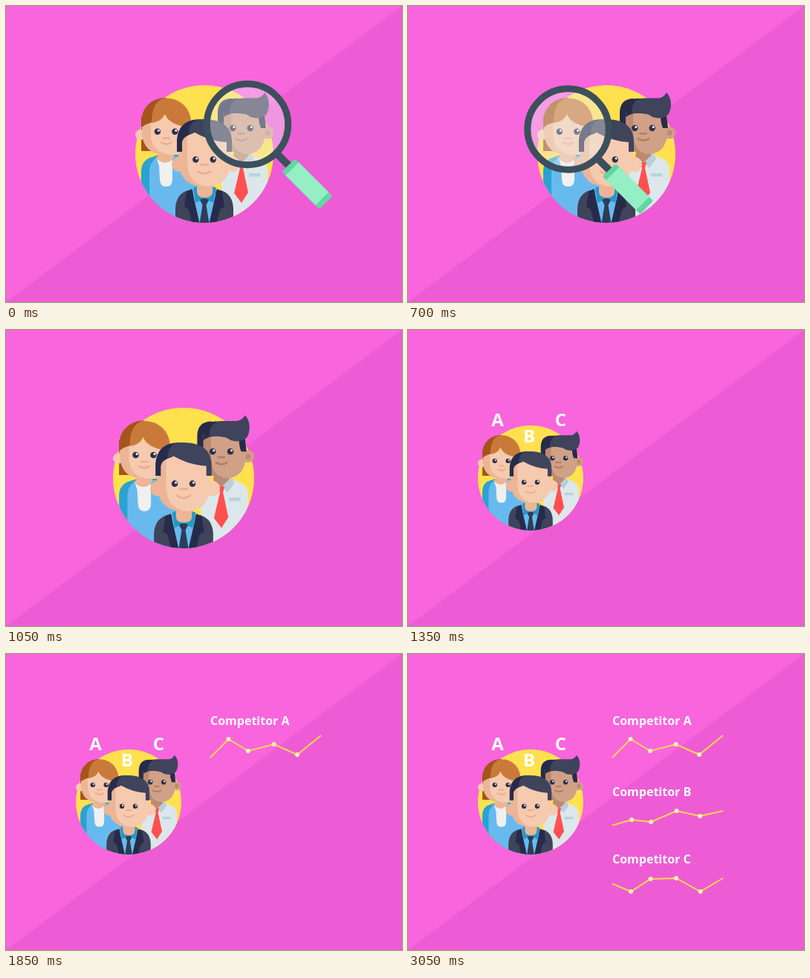
Write an HTML page that moves like this. It is 533 px wide and 400 px high and loops after 3.95 s.

```html
<!DOCTYPE html>
<html lang="en">
<head>
<meta charset="utf-8">
<title>Competitor analysis</title>
<style>
  html, body { margin: 0; width: 100%; height: 100%; overflow: hidden; }
  svg { display: block; width: 100vw; height: 100vh; }
  text { font: 700 16px "Open Sans", "Noto Sans", sans-serif; fill: #fff; }
  #labels text { font-size: 24px; text-anchor: middle; }
  .smile { fill: none; stroke-width: 2.6; stroke-linecap: round; }
</style>
</head>
<body>
<svg viewBox="0 0 533 400">
  <defs>
    <clipPath id="badge"><path d="M150 90H390V200H360A93 93 0 0 1 174 200H150Z"/></clipPath>
    <g id="eye"><circle r="4.2" fill="#2d314d"/><circle cx="1.5" cy="-1.4" r="1.5" fill="#fff"/></g>
    <g id="eyes"><use href="#eye" x="-11.7"/><use href="#eye" x="11.7"/></g>
  </defs>
  <rect width="533" height="400" fill="#f865dd"/>
  <path d="M533 0V400H0Z" fill="#ed5cd4"/>

  <g id="team">
    <circle cx="267" cy="200" r="93" fill="#ffe14f"/>
    <g clip-path="url(#badge)">
      <!-- woman -->
      <path d="M182 150H199V196H182Z" fill="#a5541a"/>
      <path d="M182 300V224Q182 208 197 204L206 201H232L262 215V300Z" fill="#2aa2d3"/>
      <path d="M193 300V224Q193 210 205 203H232L262 215V300Z" fill="#68baee"/>
      <path d="M202 204L209 209L224 207V234Q224 244 215.500 244T207 234L206 216Z" fill="#f0f0ee"/>
      <path d="M206 190H226V205Q216 218 202 206L206 200Z" fill="#ecb596"/>
      <circle cx="181" cy="174" r="7" fill="#f5caae"/>
      <path d="M183 150H249V172Q247 201 216 201T183 172Z" fill="#ecb596"/>
      <path d="M195 150H249V172Q247 201 220 201Q195 198 195 172Z" fill="#f5caae"/>
      <path d="M182 165V156C183 136 197 124 215.500 124Q205 138 197 157Q186 160 182 165Z" fill="#a5541a"/>
      <path d="M196 158C196 138 203 125 215.500 124.500C235 124.500 249 139 249 157V164C231 163 217 156 214 146C210 154 204 157 196 158Z" fill="#c97a3a"/>
      <use href="#eyes" x="215.600" y="169.700"/>
      <path class="smile" stroke="#e9ad92" d="M211.500 178.500H219.500M209 184.500Q216 189 222 184.500"/>

      <!-- man in a shirt -->
      <path d="M290 300V216L310 203H333Q352 207 352 222V300Z" fill="#dce7eb"/>
      <path d="M322 200L330 198L334 207L325 219L317 211Z" fill="#b9cfd8"/>
      <path d="M308 192H327V202L317 212L306 203Z" fill="#bb8a70"/>
      <path d="M312 211H321L319 219L326 252L317 266L307 253L315 219Z" fill="#ff5050"/>
      <path d="M327 226H342V230.500H327Z" fill="#b9d3dc"/>
      <path d="M285 165V143Q286 125 304 125V165Z" fill="#272b4b"/>
      <circle cx="352" cy="171.500" r="8" fill="#cf9f86"/>
      <circle cx="352" cy="171.500" r="3.500" fill="#bb8a70"/>
      <path d="M293 143H349V172Q347 200 320 200T293 172Z" fill="#bb8a70"/>
      <path d="M303 143H349V172Q347 200 323 200Q303 197 303 172Z" fill="#d0a087"/>
      <path d="M340 148H348L350 165H343Q340 158 340 148Z" fill="#272b4b"/>
      <path d="M293 150Q293 125 308 125H320V146Q304 142 293 150Z" fill="#272b4b"/>
      <path d="M301 145Q301 125 318 124.500H338Q345 123 348 117C355 124 356 138 350 147Q341 154 329 150Q321 143 301 145Z" fill="#3f435c"/>
      <use href="#eyes" x="317" y="165"/>
      <path class="smile" stroke="#b07d65" d="M312.500 172.500H320.500M310 179.500Q317 184 324 179.500"/>

      <!-- man in a suit -->
      <path d="M228 300V273Q229 254 245 249H289Q305 254 306 273V300Z" fill="#3f435c"/>
      <path d="M251 245H283L278 300H256Z" fill="#68baee"/>
      <path d="M252 246L258 243L267 259L276 243L283 246L279 266L267 260L255 266Z" fill="#2298c8"/>
      <path d="M257 238H278V252Q277 259 267.500 259T257 252Z" fill="#ecb596"/>
      <path d="M250 247L243 251L240 271L246 275L252 300H262ZM284 247L291 251L294 271L288 275L282 300H272Z" fill="#272b4b"/>
      <path d="M261 262Q267 258 273 262L269.500 269L274 297H260L264.500 269Z" fill="#2f3c57"/>
      <circle cx="233" cy="214" r="10" fill="#ecb596"/>
      <circle cx="305" cy="214" r="10" fill="#f5caae"/>
      <path d="M232 172H302V210Q300 244 267 244T232 210Z" fill="#ecb596"/>
      <path d="M244 172H302V210Q300 244 270 244Q244 240 244 210Z" fill="#f5caae"/>
      <path d="M230 197V181Q232 153 262 153L252 172Q238 176 237 184V197Z" fill="#272b4b"/>
      <path d="M246 173Q247 153 263 153H268Q304 154 304 184V197H297V184Q275 183 254 171Z" fill="#3f435c"/>
      <use href="#eyes" x="267" y="207.500"/>
      <path class="smile" stroke="#e9ad92" d="M262.500 214.500H271.500M258.500 223.500Q267 229.500 275.500 223.500"/>
    </g>
  </g>

  <g id="lens">
    <circle r="55" fill="#eee" fill-opacity=".4" stroke="none"/>
    <circle r="54.700" fill="none" stroke="#3c4f5c" stroke-width="9"/>
    <g transform="rotate(45)">
      <path d="M58 -5H80V5H58Z" fill="#3c4f5c"/>
      <rect x="78" y="-12.500" width="71.500" height="25" rx="3" fill="#61d6a1"/>
      <path d="M85 -12.500H142V12.500H85Z" fill="#94efc5"/>
    </g>
  </g>

  <g id="labels">
    <text x="120.500" y="130">A</text>
    <text x="163" y="152">B</text>
    <text x="205.500" y="130">C</text>
  </g>
  <g id="charts"></g>
</svg>
<script>
const LOOP = 3950;
const $ = id => document.getElementById(id);
const show = (node, on) => node.setAttribute("visibility", on ? "visible" : "hidden");

const charts = [
  { name: "A", start: 1850, baseline: 96, points: [[275, 140], [299.5, 115], [326, 131], [360.5, 122], [392, 136], [424, 110]] },
  { name: "B", start: 2450, baseline: 192, points: [[275, 231.5], [301, 224], [327, 227], [361.5, 212], [393, 219], [424, 212]] },
  { name: "C", start: 3050, baseline: 283, points: [[275, 310.5], [300, 321], [326.5, 304], [361, 303], [393.5, 321], [424, 303]] }
];
$("charts").innerHTML = charts.map(({ name, baseline, points }) => `<g>
  <text x="275" y="${baseline}">Competitor ${name}</text>
  <polyline points="${points.join(" ")}" fill="none" stroke="#ffd64b" stroke-width="2"/>
  ${points.slice(1, -1).map(([x, y]) => `<circle cx="${x}" cy="${y}" r="3" fill="#fff3b4"/>`).join("")}
</g>`).join("");

const lensStops = [[325, 160], [266.5, 198.5], [215.5, 166.5]];

function render(t) {
  // The lens jumps from face to face, then the badge steps left and shrinks.
  const stop = lensStops[Math.floor(t / 350)];
  show($("lens"), stop);
  if (stop) $("lens").setAttribute("transform", `translate(${stop})`);

  const step = Math.min(3, Math.floor((t - 1050) / 100));
  const x = step < 0 ? 267 : 239 - step * 74 / 3;
  const radius = step < 0 ? 93 : 95 - step * 8;
  $("team").setAttribute("transform", `translate(${x} 200) scale(${radius / 93}) translate(-267 -200)`);

  show($("labels"), t >= 1350);
  charts.forEach((chart, i) => show($("charts").children[i], t >= chart.start));
}

const begin = performance.now();
function tick() {
  render((performance.now() - begin) % LOOP);
  requestAnimationFrame(tick);
}
tick();
</script>
</body>
</html>
```
